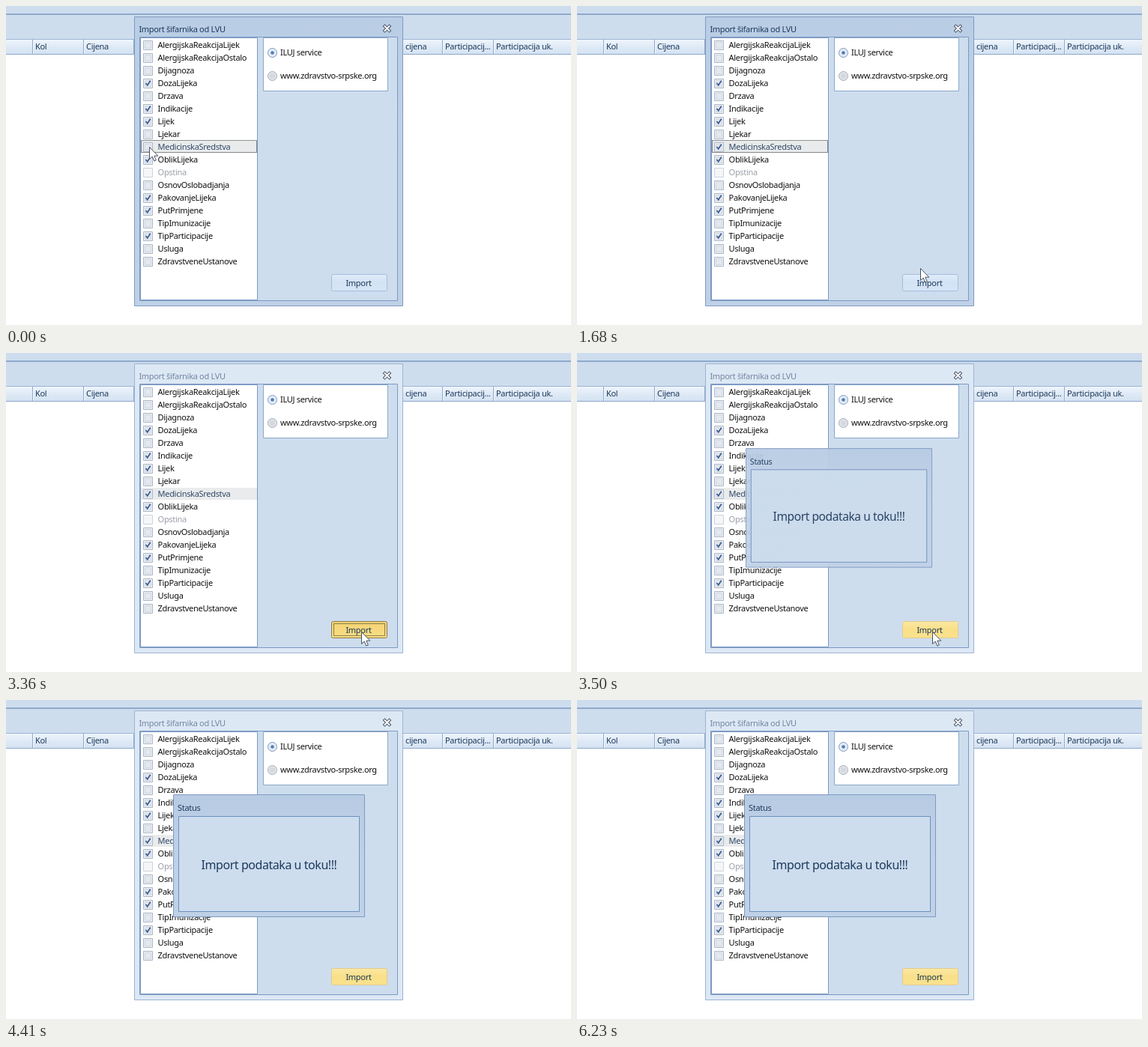
Write an HTML page with a canvas that moves like this. It is 754 by 426 pixels and loops after 6510 ms.

```html
<!DOCTYPE html>
<html lang="bs">
<head>
<meta charset="utf-8">
<title>Import šifarnika</title>
<style>
  html, body { margin: 0; width: 100%; height: 100%; overflow: hidden; background: #fff; }
  canvas { display: block; }
</style>
</head>
<body>
<canvas id="stage" width="754" height="426"></canvas>
<script>
const ctx = document.getElementById('stage').getContext('2d');
const LOOP = 6510, STEP = 70;
const PANEL = '#cdddee', EDGE = '#7d9ac3', NAVY = '#1e395b', INK = '#111';

const items = ['AlergijskaReakcijaLijek', 'AlergijskaReakcijaOstalo', 'Dijagnoza', 'DozaLijeka',
  'Drzava', 'Indikacije', 'Lijek', 'Ljekar', 'MedicinskaSredstva', 'OblikLijeka', 'Opstina',
  'OsnovOslobadjanja', 'PakovanjeLijeka', 'PutPrimjene', 'TipImunizacije', 'TipParticipacije',
  'Usluga', 'ZdravstveneUstanove'];
const checkedItems = new Set([3, 5, 6, 9, 12, 13, 15]);
const SELECTED = 8, DISABLED = 10;

const columns = [[39, 'Kol'], [107, 'Cijena'], [533, 'cijena'], [586, 'Participacij...'], [654, 'Participacija uk.']];

const clamp = v => Math.min(1, Math.max(0, v));
const progress = (t, from, to) => clamp((t - from) / (to - from));
const smooth = p => p * p * (3 - 2 * p);
const easeOut = p => 1 - (1 - p) ** 2;

function text(str, x, y, color = INK, size = 11, align = 'left') {
  ctx.font = `${size}px "Noto Sans", sans-serif`;
  ctx.letterSpacing = `${-0.028 * size}px`;
  ctx.textAlign = align;
  ctx.fillStyle = color;
  ctx.fillText(str, x, y);
}

function vertical(y, h, ...colors) {
  const g = ctx.createLinearGradient(0, y, 0, y + h);
  colors.forEach((c, i) => g.addColorStop(i / (colors.length - 1), c));
  return g;
}

function fill(x, y, w, h, color) {
  ctx.fillStyle = color;
  ctx.fillRect(x, y, w, h);
}

function box(x, y, w, h, color, edge, radius = 0) {
  ctx.beginPath();
  ctx.roundRect(x + 0.5, y + 0.5, w - 1, h - 1, radius);
  ctx.fillStyle = color;
  ctx.fill();
  ctx.strokeStyle = edge;
  ctx.lineWidth = 1;
  ctx.stroke();
}

function dotted(x, y, w, h) {
  ctx.setLineDash([1, 1]);
  ctx.lineWidth = 1;
  ctx.strokeStyle = '#222';
  ctx.strokeRect(x + 0.5, y + 0.5, w - 1, h - 1);
  ctx.setLineDash([]);
}

function polyline(points, color, width) {
  ctx.beginPath();
  points.forEach(([x, y]) => ctx.lineTo(x, y));
  ctx.strokeStyle = color;
  ctx.lineWidth = width;
  ctx.stroke();
}

function background() {
  fill(0, 0, 754, 426, '#fff');
  fill(0, 0, 754, 44, PANEL);
  fill(0, 10, 754, 2, '#8faacb');
  fill(0, 44, 754, 21, vertical(44, 21, '#f0f6fd', '#dfeaf6', '#d2e1f1'));
  fill(0, 44, 754, 1, '#9db4d2');
  fill(0, 64, 754, 1, '#8fa9cb');
  for (const x of [35, 103, 170, 582, 650]) {
    fill(x, 45, 1, 19, '#8fa9cb');
    fill(x + 1, 45, 1, 19, '#f4f9fe');
  }
  for (const [x, label] of columns) text(label, x, 58, NAVY);
}

function checkbox(y, checked, disabled) {
  box(183, y - 6, 13, 13, disabled ? '#f4f6f8' : '#eef2f6', disabled ? '#cdd4dd' : '#aab6c5');
  if (!disabled) box(185, y - 4, 9, 9, '#e4e9ef', '#cfd6df');
  if (checked) polyline([[186.5, y], [188.7, y + 2.8], [192.7, y - 3.2]], '#3a5a92', 1.7);
}

function list(t, focused) {
  box(179, 42, 157, 351, '#fff', EDGE);
  items.forEach((name, i) => {
    const y = 52 + 17 * i;
    if (i === SELECTED) {
      fill(180, y - 8, 155, 16, '#e9ebec');
      if (focused) dotted(180, y - 9, 155, 17);
    }
    checkbox(y, checkedItems.has(i) || (i === SELECTED && t >= 350), i === DISABLED);
    text(name, 202.6, y + 4, i === DISABLED ? '#9a9fa8' : i === SELECTED ? '#2f4866' : INK);
  });
}

function radio(y, on, label) {
  ctx.beginPath();
  ctx.arc(355.5, y + 0.5, 6, 0, 7);
  ctx.fillStyle = on ? '#e2ecf8' : '#e5e8ec';
  ctx.fill();
  ctx.lineWidth = 1;
  ctx.strokeStyle = on ? '#8199bc' : '#a3abb6';
  ctx.stroke();
  ctx.beginPath();
  ctx.arc(355.5, y + 0.5, on ? 2.3 : 4, 0, 7);
  ctx.fillStyle = on ? '#557bb0' : '#d6dae0';
  ctx.fill();
  text(label, 366, y + 4);
}

function closeMark() {
  ctx.lineCap = 'square';
  for (const [color, width] of [['#4a5464', 4], ['#f7fafd', 2]]) {
    polyline([[505.5, 27], [511.5, 33]], color, width);
    polyline([[511.5, 27], [505.5, 33]], color, width);
  }
  ctx.lineCap = 'butt';
}

function button(hot, pressed) {
  const face = pressed ? vertical(358, 23, '#f3d273', '#f9df85')
    : hot ? vertical(358, 23, '#fae8a4', '#f9df88', '#fae28e')
    : vertical(358, 23, '#e0ecf9', '#d2e2f4', '#d7e6f7');
  box(434, 358, 75, 23, face, pressed ? '#8f7a45' : hot ? '#e0cb90' : '#a5bddb', 2);
  if (pressed) dotted(437, 361, 69, 17);
  text('Import', 470.5, 374, NAVY, 11, 'center');
}

function dialog(t, cursor) {
  const active = t < 3290, pressed = t >= 3220 && t < 3430;
  const hot = t >= 1680 && cursor.y >= 358;
  box(171, 14, 359, 387, active ? vertical(14, 387, '#b9cde5', '#bfd1e7', '#bfd1e7') : '#dde8f5',
    active ? '#7f9ac0' : '#9db4d2');
  text('Import šifarnika od LVU', 177.4, 35, active ? NAVY : '#7286a1');
  closeMark();
  box(178, 41, 345, 353, PANEL, EDGE);
  list(t, t < 3220);
  box(343, 42, 167, 72, '#fff', '#8ca7ca');
  radio(62, true, 'ILUJ service');
  radio(93, false, 'www.zdravstvo-srpske.org');
  button(hot, pressed);
}

function statusWindow(t) {
  if (t < 3430) return;
  const p = progress(t, 3360, 3570);
  const scale = 1 - 0.245 * (1 - p) ** 2;
  ctx.save();
  ctx.globalAlpha = clamp(p * 1.4);
  ctx.translate(297, 167);
  ctx.scale(scale, scale);
  ctx.translate(-297, -167);
  box(223, 126, 256, 164, vertical(126, 164, '#b7cbe3', '#bfd1e7', '#bfd1e7'), '#7f9ac0');
  text('Status', 229, 148, NAVY);
  box(230, 155, 242, 128, PANEL, '#6f8fbc');
  text('Import podataka u toku!!!', 351, 226, NAVY, 16, 'center');
  ctx.restore();
}

function cursorAt(t) {
  const travel = smooth(progress(t, 980, 1680));
  const settle = easeOut(progress(t, 1680, 2100));
  const leave = progress(t, 3990, 4340) ** 1.5;
  return {
    x: 191 + 267 * travel + 16 * settle + 4 * leave,
    y: 188 + 162 * travel + 22 * settle + 58 * leave
  };
}

function drawCursor({ x, y }) {
  ctx.save();
  ctx.translate(Math.round(x) + 0.5, Math.round(y) + 0.5);
  ctx.beginPath();
  for (const [px, py] of [[0, 0], [0, 16], [3.7, 12.6], [6.3, 18.6], [8.8, 17.5], [6.3, 11.7], [11.3, 11.7]]) {
    ctx.lineTo(px, py);
  }
  ctx.closePath();
  ctx.fillStyle = '#fff';
  ctx.fill();
  ctx.lineWidth = 1;
  ctx.strokeStyle = '#4a5160';
  ctx.stroke();
  ctx.restore();
}

const start = performance.now();
function frame() {
  const elapsed = (performance.now() - start) % LOOP;
  const t = Math.floor(elapsed / STEP) * STEP;
  const cursor = cursorAt(t);
  background();
  dialog(t, cursor);
  statusWindow(t);
  drawCursor(cursor);
  requestAnimationFrame(frame);
}
frame();
</script>
</body>
</html>
```
